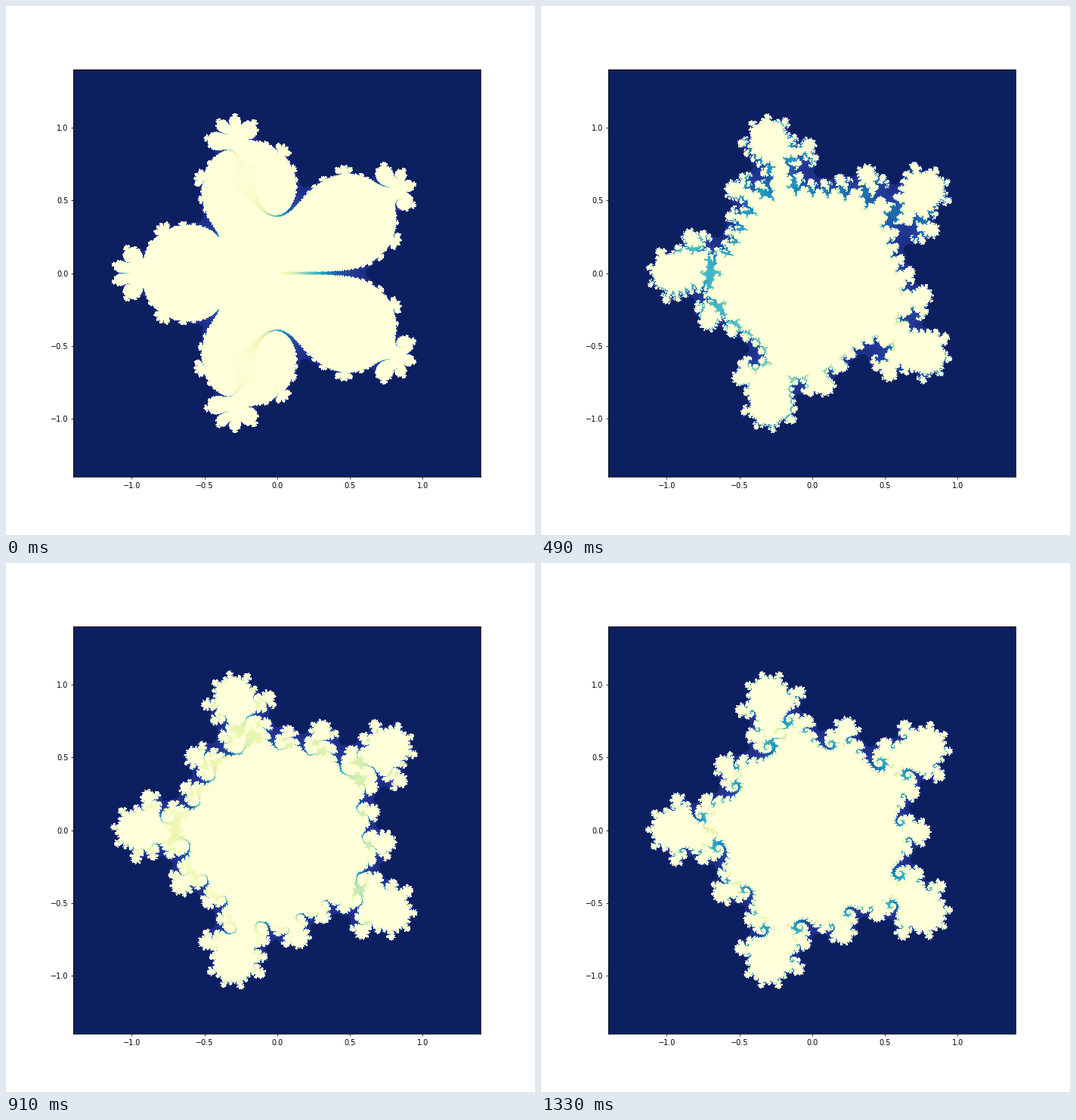
These frames come from a looping animation (700x700 px, 1400 ms). A matplotlib script:

```python
import numpy as np
import matplotlib.pyplot as plt
from matplotlib.animation import FuncAnimation

FRAMES = 20
INTERVAL = 70
HALF = 1.4          # half width of the square in the complex plane
SIZE = 539          # samples per side
MAX_ITER = 50
RADIUS2 = 4.0
SHIFT = 0.01
GROWTH = 1.001      # modulus of the multiplier
TURN = -np.pi / 100  # turn of the multiplier per frame
FLAT = 5            # escape counts below this share one shade

centres = (np.arange(SIZE) + 0.5) / SIZE * 2 * HALF - HALF
plane = (centres[None, :] + 1j * centres[:, None]).ravel()


def escape_counts(angle):
    """Escape counts of z -> GROWTH e^(i angle) (z + z^6) + SHIFT."""
    factor = GROWTH * np.exp(1j * angle)
    counts = np.full(plane.size, MAX_ITER)
    index = np.arange(plane.size)
    z = plane
    for n in range(1, MAX_ITER):
        z2 = z * z
        z = factor * z * (1 + z2 * z2 * z) + SHIFT
        inside = z.real ** 2 + z.imag ** 2 <= RADIUS2
        counts[index[~inside]] = n
        index, z = index[inside], z[inside]
    counts[counts < FLAT] = 1
    return counts.reshape(SIZE, SIZE)


pictures = [escape_counts(TURN * i) for i in range(FRAMES)]

fig, ax = plt.subplots(figsize=(10, 10), dpi=70)
image = ax.imshow(pictures[0], cmap="YlGnBu_r", vmin=0, vmax=MAX_ITER,
                  origin="lower", extent=(-HALF, HALF, -HALF, HALF),
                  interpolation="nearest")


def update(i):
    image.set_data(pictures[i % FRAMES])
    return [image]


anim = FuncAnimation(fig, update, frames=FRAMES, interval=INTERVAL,
                     repeat=True, repeat_delay=0)
plt.show()
```
